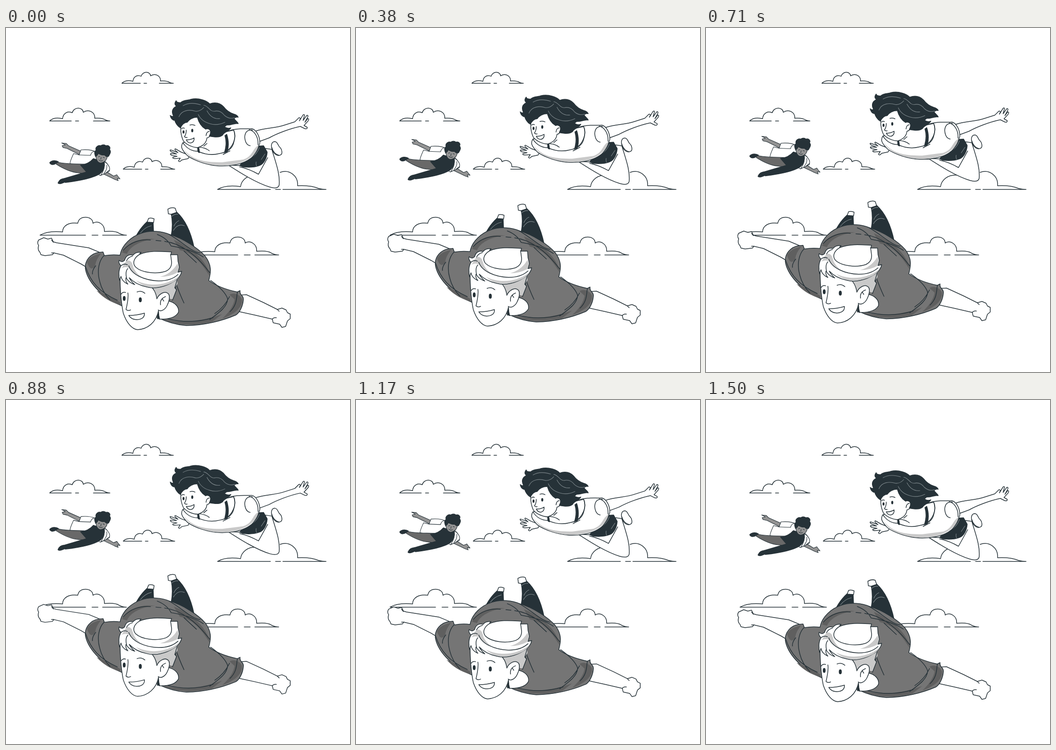
Recreate the animation shown at these times as an HTML page. Size 748 by 748 pixels, loop 1.54 s.

```html
<!DOCTYPE html>
<html lang="en">
<head>
<meta charset="utf-8">
<title>Flying friends</title>
<style>
html, body { margin: 0; height: 100%; overflow: hidden; background: #fff; }
svg { display: block; width: 100vw; height: 100vh; }
path, ellipse { fill: #fff; stroke: #263238; stroke-width: 1.5; stroke-linecap: round; stroke-linejoin: round; vector-effect: non-scaling-stroke; }
.line { fill: none; }
.dark { fill: #263238; }
.shirt { fill: #757575; }
.skin { fill: #949494; }
.pants { fill: #696969; }
.shade { fill: #5f5f5f; stroke: none; }
.light { fill: #c9c9c9; stroke: none; }
.crease { fill: none; stroke: #7d878b; stroke-width: 1.1; }
.thin { stroke-width: 1.1; }
</style>
</head>
<body>
<svg viewBox="0 0 748 748">
<defs>
  <path id="small" class="line" d="M47 0H0C4-5 14-9 28-5C29-16 38-23 49-18C51-25 57-28 62-28C68-28 73-24 73-19C85-27 99-19 98-6C112-7 119-4 122-2Q127 0 131 0H95M63 0H56"/>
  <path id="large" class="line" d="M99 0H0C10-6 28-9 49-7C49-20 62-29 82-26C84-36 91-39 99-39C108-39 115-34 115-26C127-33 141-23 140-8C153-9 166-9 172-4Q180 0 188 0H136M126 0H113"/>
</defs>

<use href="#small" transform="translate(252 120.3) scale(.855)"/>
<use href="#small" transform="translate(95 202.3)"/>
<use href="#small" transform="translate(255 307) scale(.855)"/>
<use href="#large" x="74" y="450.5"/>
<use href="#large" x="405" y="493.5"/>
<path class="line" d="M460 351C472 344 490 342 510 345C512 330 526 318 548 320M596 314C616 306 636 322 634 343C652 342 668 344 680 349Q688 351 696 351H602M597 351H586M575 351H460"/>

<g id="flyers">
  <g id="boy">
    <path class="skin thin" d="M163 268L136 256L131 251L121 250L129 254L122 256L124 260L133 262L159 275Z"/>
    <path class="skin thin" d="M218 312L234 322L241 319L243 322L248 328L242 327L244 332L236 329L230 326L213 318Z"/>
    <path class="thin" d="M163 265C176 264 188 265 196 270L215 290C222 295 226 304 225 311L216 316L205 321L180 303L139 295C140 287 144 280 147 273L159 276Z"/>
    <path class="line thin" d="M159 276L184 277Q185 270 192 268M139 295Q155 298 172 296"/>
    <path class="pants thin" d="M110 291C126 296 148 295 170 296L178 314Q168 317 158 315C142 314 123 305 109 296Z"/>
    <path class="dark" d="M190 284L215 292C217 300 212 311 204 317C190 326 163 332 129 336L124 328L175 313L162 298C174 297 184 291 190 284Z"/>
    <path class="dark" d="M95 293C99 288 108 287 114 291L106 296Q98 299 95 293ZM113 337C116 330 122 326 131 328L128 335Q115 341 113 337Z"/>
    <path class="thin" d="M214 291C222 295 227 304 225 309L216 316L206 320Q216 307 214 291Z"/>
    <path class="line thin" d="M219 298Q221 307 213 316"/>
    <path class="skin thin" d="M196 273C194 287 201 295 208 293C217 291 222 283 220 273C214 266 202 267 196 273Z"/>
    <path class="dark" d="M195 280C191 271 193 267 196 266C193 259 201 254 206 256C211 252 216 255 217 256C224 254 228 260 225 264C230 269 225 275 223 279C218 282 216 277 214 276C207 278 204 273 200 273C200 277 197 277 195 280Z"/>
    <path class="line thin" d="M201 280L204 279M211 281L214 282M207 281L206 286M202 287Q206 291 210 288"/>
  </g>

  <g id="woman">
    <path d="M400 277L381 270L369 263Q366 262 368 266L374 271L358 265Q355 265 359 269L371 274L358 273Q356 275 361 277L372 279L363 281Q361 284 368 284L379 283L375 289Q377 293 382 287L396 284Z"/>
    <path d="M483 298C508 314 544 337 574 346Q592 351 594 341C596 317 587 294 578 264L565 262L530 300Z"/>
    <path class="line" d="M569 282L549 318M508 302Q528 306 549 318"/>
    <path d="M579 265C575 254 578 247 585 247C591 248 591 255 595 259C600 263 602 274 597 276C591 280 582 274 579 265Z"/>
    <path class="line" d="M578 260Q582 274 594 277"/>
    <path class="dark" d="M508 299L546 257L560 256L568 270C567 284 560 296 551 299C537 304 523 303 515 302Z"/>
    <path class="crease" d="M551 260Q546 274 533 282M563 274L555 286M544 291Q543 297 545 300"/>
    <path d="M543 224C565 217 586 218 606 211L628 204L635 197Q638 193 640 197L638 202L646 189Q649 187 649 190L646 201L654 190Q658 189 656 194L650 205L656 197Q660 197 657 202L648 212L655 216Q656 220 650 219L640 214C616 219 588 230 572 239L545 249Z"/>
    <path d="M385 249C379 257 381 264 395 278C410 289 440 299 464 300C488 301 515 296 530 285C541 278 546 266 552 250C552 236 545 222 535 219C520 220 501 217 484 224L437 246Z"/>
    <path class="light" d="M388 265C407 289 435 292 470 292L516 286C537 279 535 263 549 255C544 285 503 301 459 299C424 296 395 281 388 265Z"/>
    <path d="M418 246L417 268C430 274 445 278 464 273C481 270 492 262 495 250Q500 234 495 222L445 233Z"/>
    <path class="line" d="M529 221C541 224 549 238 548 254M536 222C519 220 517 236 521 247Q524 255 531 256M495 222C503 238 492 263 474 271M472 275L487 267M385 250C393 262 405 268 417 268"/>
    <path class="dark" d="M476 234C480 247 479 258 475 271L481 269C485 257 484 244 480 231ZM416 258L418 270L421 271L419 258Z"/>
    <path class="line" d="M419 259Q434 260 442 267M430 257L437 251"/>
    <path d="M383 202C377 219 381 236 386 246C394 255 407 260 417 260C430 256 436 248 437 239C449 237 448 219 438 219L416 186Z"/>
    <path class="dark" d="M379 217C372 213 368 205 367 201Q359 200 357 190Q362 194 364 191C359 181 362 174 371 170Q364 166 370 158Q371 163 380 162C387 155 397 158 402 155C419 151 437 158 443 165C457 160 467 165 473 171Q482 183 495 187Q503 189 505 194Q499 193 496 197C499 202 504 204 505 208C498 206 489 212 480 211L475 215Q482 220 489 217C485 225 474 226 471 233C464 239 452 237 442 235C448 225 443 216 434 220C424 214 419 205 416 194C406 194 398 199 394 205C388 205 383 210 379 217Z"/>
    <path class="crease" d="M376 193C382 178 399 177 412 181Q422 182 430 173M430 168C440 169 443 182 453 181Q466 178 475 190Q485 199 497 195M418 188Q425 203 443 208Q459 213 476 205M437 180Q447 199 465 197M385 169Q400 160 423 167"/>
    <path class="line" d="M392 222Q392 231 388 236Q390 239 394 238M382 219Q384 216 388 218M400 211Q406 209 411 212M435 234Q436 225 442 225"/>
    <ellipse class="dark" cx="386" cy="226" rx="1.4" ry="2.8"/>
    <ellipse class="dark" cx="405" cy="223" rx="1.5" ry="3"/>
    <path d="M392 243Q401 244 409 239Q410 248 402 250Q395 250 392 243Z"/>
  </g>

  <g id="man">
    <path class="dark" d="M275 470C283 448 296 431 307 421L320 422L321 446ZM359 404Q363 397 371 400C390 417 402 444 409 477L359 453Q364 426 359 404Z"/>
    <path d="M307 422L310 414Q316 412 322 415L321 423ZM353 404L352 394Q360 389 368 392L371 401L359 405Z"/>
    <path class="crease" d="M292 446Q302 433 316 430M360 410Q366 404 374 405M365 431Q369 422 376 419M364 440Q374 424 388 430"/>
    <path d="M204 488L180 478L110 467L103 465L99 457L91 459L82 456L71 461Q67 467 71 473Q68 482 74 488L76 493L85 495L101 493L104 489L125 494L163 513L180 523Z"/>
    <path class="line" d="M99 461L103 466M104 489L99 489"/>
    <path d="M505 581L523 580L560 597L590 612L600 609L609 613L612 619L618 622V632L612 637L608 649L600 651L595 644L581 641L579 633L540 624L508 617Z"/>
    <path class="line" d="M590 612L594 616M579 633Q582 629 588 630"/>
    <path class="shirt" d="M248 494C252 471 273 453 295 446C314 439 340 442 356 449C385 457 418 479 433 496C449 517 445 533 441 549C460 563 484 570 503 574L509 571Q508 577 513 582Q517 586 516 592C515 604 509 618 500 624C472 636 438 646 392 647C367 645 347 638 331 630L252 604C215 590 180 557 173 526C169 505 186 490 201 488L211 487L214 495Q231 492 248 494Z"/>
    <path class="shade" d="M252 488C262 468 290 455 324 459C292 462 270 475 263 491ZM365 461C400 474 438 505 443 540C426 512 409 490 378 483ZM176 509C184 495 197 493 207 490Q195 504 194 517Q184 532 176 509ZM486 580C496 574 509 580 513 590C515 607 498 622 470 632Q494 610 497 590ZM336 630C370 643 420 640 470 622L448 639C401 649 360 645 336 630ZM197 571Q220 580 249 597L248 602Q218 594 197 571Z"/>
    <path class="line" d="M213 495C202 506 197 529 204 552Q209 573 226 591M173 519C184 553 204 575 242 592M445 549Q476 571 482 589C481 606 466 617 443 634M503 575C501 585 503 602 487 617M255 483C271 465 293 459 314 461M326 462L337 463M345 464C379 468 413 492 443 532M329 449Q350 457 359 474M359 474C391 479 416 489 429 498M387 485L414 510M369 554Q378 579 387 598M195 517Q187 527 188 535M355 449C382 464 405 488 422 489M486 584Q475 607 454 621M350 632Q402 645 450 630"/>
    <path d="M331 608L351 593C367 596 377 606 375 618Q367 634 333 633Z"/>
    <path class="dark" d="M331 621L334 632L329 632Z"/>
    <path d="M248 537C248 562 250 596 255 620C262 641 274 655 286 656C307 655 327 641 332 613L367 574L372 543L310 515Z"/>
    <path class="light" d="M314 561L372 546L373 556L367 565L370 570L363 590L352 588Q350 572 337 579L328 588Q325 570 314 561Z"/>
    <path class="line" d="M314 561Q325 570 328 588M372 548L367 565L371 569L362 592"/>
    <path d="M331 613C337 618 346 612 350 604Q358 588 354 579C346 569 332 579 328 589"/>
    <path class="line" d="M336 602Q334 589 347 584M340 589L343 594"/>
    <path d="M247 549C244 532 246 524 250 517Q244 511 246 505Q252 511 258 505C261 493 270 492 276 494Q283 486 294 488Q290 490 291 492C313 483 340 486 360 487L358 493L373 493L374 507L377 520L374 531L382 529Q380 542 365 551C347 563 324 568 306 563Q282 558 268 543Q271 550 280 558Q267 554 261 543Q259 550 265 557Q252 551 250 540Z"/>
    <path class="light" d="M262 506C272 503 275 512 277 521C284 536 296 545 312 548Q286 541 271 525Q264 517 252 522Q257 512 262 506ZM335 541Q359 535 373 512L376 521L372 532Q356 541 335 541ZM283 549C310 563 350 561 377 539C368 557 333 567 306 562Q292 558 283 549Z"/>
    <path class="line" d="M291 492C280 498 273 510 282 520C295 532 326 536 347 529Q361 523 360 508L358 493M262 506Q266 498 275 496M267 517C273 536 301 549 332 550Q359 550 374 536M250 517Q257 511 264 515M265 523Q259 529 262 543"/>
    <path class="line" d="M265 576Q267 586 261 612Q265 616 271 613M250 579Q254 573 260 575M285 574Q294 570 302 577"/>
    <ellipse class="dark" cx="257" cy="588" rx="2.3" ry="4.5"/>
    <ellipse class="dark" cx="292" cy="591" rx="2.5" ry="4.6"/>
    <path d="M267 625Q285 625 301 620C302 631 292 635 282 634Q272 633 267 625Z"/>
  </g>
</g>
</svg>
<script>
const LOOP = 1540, PEAK = 720, REST = 1490, LIFT = 14.7;
const flyers = document.getElementById('flyers');

function draw(now) {
  const t = now % LOOP;
  const rise = Math.max(0, Math.min(t / PEAK, (REST - t) / (REST - PEAK)));
  flyers.setAttribute('transform', `translate(0 ${-LIFT * rise})`);
  requestAnimationFrame(draw);
}
draw(0);
</script>
</body>
</html>
```
